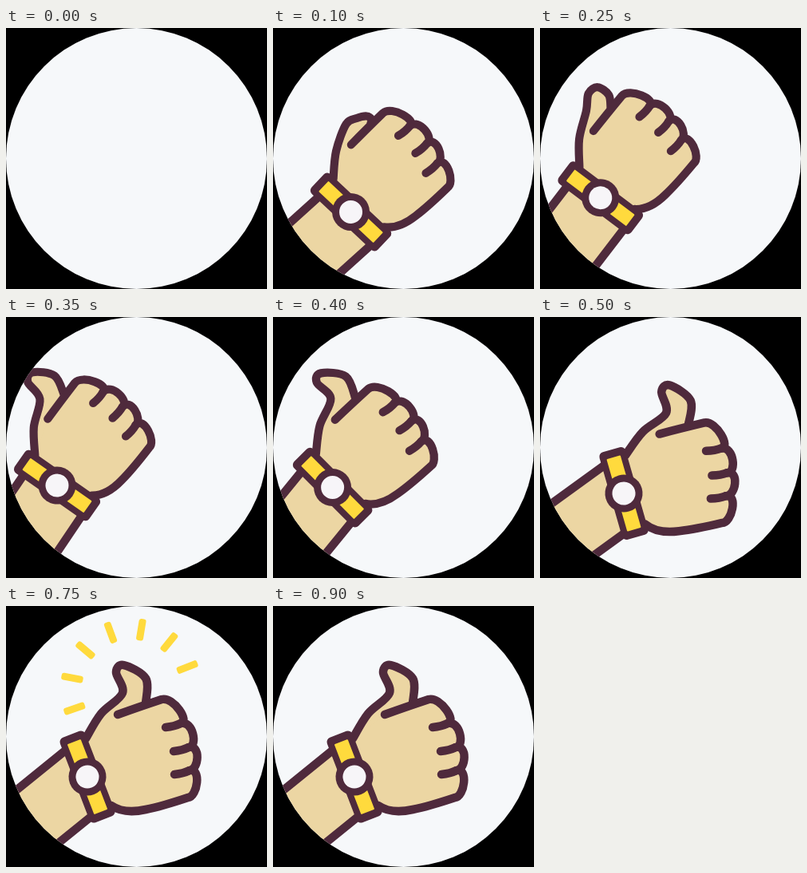
An HTML page with a canvas that plays this animation: 327x327 px, repeating every 0.95 s.

```html
<!DOCTYPE html>
<html lang="en">
<head>
<meta charset="utf-8">
<title>Thumbs up</title>
<style>
  html, body { margin: 0; width: 100%; height: 100%; overflow: hidden; background: #000; }
  canvas { display: block; width: 327px; height: 327px; }
</style>
</head>
<body>
<canvas id="stage"></canvas>
<script>
const SIZE = 327, MID = SIZE / 2, LOOP = 950, STEP = 50, RAD = Math.PI / 180;
const INK = '#4f2a3c', SKIN = '#ecd6a3', GOLD = '#ffda3d', PAPER = '#f6f8fa', DIAL = '#f7f5f8';

const canvas = document.getElementById('stage');
const ctx = canvas.getContext('2d');
const dpr = window.devicePixelRatio || 1;
canvas.width = canvas.height = Math.round(SIZE * dpr);

const mix = (a, b, k) => a + (b - a) * k;
const clamp = k => Math.max(0, Math.min(1, k));
const easeOut = k => 1 - (1 - k) ** 2;
const easeBoth = k => k * k * (3 - 2 * k);

// Key poses; each is reached at its time with its easing
const POSES = [
  { at: 0, x: -10, y: 330, turn: -24, slope: 42, size: 0.97 },
  { at: 150, x: 111, y: 218, turn: -26, slope: 42, size: 0.97, ease: easeOut },
  { at: 350, x: 64, y: 211, turn: -34, slope: 56, size: 0.97, ease: easeOut },
  { at: 500, x: 105, y: 221, turn: 5, slope: 36, size: 1, ease: easeBoth },
  { at: 600, x: 102, y: 214, turn: 0, slope: 39, size: 1, ease: easeOut }
];

function poseAt(t) {
  const i = POSES.findIndex(p => p.at > t);
  if (i < 0) return POSES[POSES.length - 1];
  const a = POSES[i - 1], b = POSES[i];
  const k = b.ease((t - a.at) / (b.at - a.at));
  const pose = {};
  for (const key of ['x', 'y', 'turn', 'slope', 'size']) pose[key] = mix(a[key], b[key], k);
  return pose;
}

// Hand shape, drawn around a wrist at 102, 214
const KNUCKLES = [[195, 117], [219, 147], [229, 177], [230, 206], [228, 240]];

function makeHand() {
  const edge = new Path2D('M140 136Q165 127 195 117');
  KNUCKLES.slice(1).forEach(([x, y], i) => {
    const [px, py] = KNUCKLES[i];
    edge.bezierCurveTo(px + 15, py - 4, x + 12, y - 1, x, y);
  });
  edge.quadraticCurveTo(195, 251, 175, 255);
  edge.quadraticCurveTo(148, 261, 132, 250);

  const fill = new Path2D(edge);
  fill.lineTo(112, 250);
  fill.lineTo(100, 166);

  const creases = new Path2D();
  for (const [x, y] of KNUCKLES.slice(1, 4)) {
    creases.moveTo(x, y);
    creases.quadraticCurveTo(x - 8, y + 4, x - 19, y + 5);
  }
  return { edge, fill, creases };
}
const hand = makeHand();

// The thumb end swings around its joint as it lifts from 0 to 1
function thumbPath(lift) {
  const grow = Math.sin(lift * Math.PI / 2);
  const swing = (from, to, short, long) => {
    const a = mix(from, to, lift) * RAD, r = mix(short, long, grow);
    return [150 + r * Math.cos(a), 118 + r * Math.sin(a)];
  };
  const pts = [
    [100, 166], [119, 135], [146, 109],
    swing(-40, -109, 15, 37), swing(-15, -93, 25, 44), swing(0, -47, 28, 37),
    [175, 122]
  ];
  const at = n => pts[Math.max(0, Math.min(pts.length - 1, n))];
  const path = new Path2D();
  path.moveTo(...pts[0]);
  for (let n = 0; n < pts.length - 1; n++) {
    const [p, q, r, s] = [at(n - 1), at(n), at(n + 1), at(n + 2)];
    path.bezierCurveTo(
      q[0] + (r[0] - p[0]) / 6, q[1] + (r[1] - p[1]) / 6,
      r[0] - (s[0] - q[0]) / 6, r[1] - (s[1] - q[1]) / 6, r[0], r[1]);
  }
  return path;
}

function disc(x, y, r, color) {
  ctx.fillStyle = color;
  ctx.beginPath();
  ctx.arc(x, y, r, 0, 7);
  ctx.fill();
}

function box(x, y, w, h, r, color) {
  ctx.fillStyle = color;
  ctx.beginPath();
  ctx.roundRect(x, y, w, h, r);
  ctx.fill();
}

// Run a drawing with its own position, rotation and scale
function placed(x, y, angle, size, paint) {
  ctx.save();
  ctx.translate(x, y);
  ctx.rotate(angle);
  ctx.scale(size, size);
  paint();
  ctx.restore();
}

function drawRays(t) {
  if (t < 600 || t >= 850) return;
  const inner = mix(48, 89, clamp((t - 700) / 150));
  const outer = mix(48, 89, clamp((t - 550) / 100));
  for (let i = 0; i < 7; i++) {
    placed(157, 104, (161 + 29.6 * i) * RAD, 1, () => box(inner, -4.5, outer - inner, 9, 3, GOLD));
  }
}

function drawForearm({ x, y, slope }, wrist) {
  const c = Math.cos(wrist), s = Math.sin(wrist);
  const near = side => [x - 10 * c - side * s, y - 10 * s + side * c];
  const far = p => [p[0] - 260 * Math.cos(slope * RAD), p[1] + 260 * Math.sin(slope * RAD)];
  const top = near(-42), low = near(47);
  const area = new Path2D(), lines = new Path2D();
  for (const p of [far(top), top, low, far(low)]) area.lineTo(...p);
  for (const p of [top, low]) {
    lines.moveTo(...far(p));
    lines.lineTo(...p);
  }
  ctx.fillStyle = SKIN;
  ctx.fill(area);
  ctx.stroke(lines);
}

function drawHand(lift) {
  const thumb = thumbPath(lift), thumbFill = new Path2D(thumb);
  thumbFill.lineTo(150, 170);
  ctx.translate(-102, -214);
  ctx.fillStyle = SKIN;
  ctx.fill(thumbFill);
  ctx.fill(hand.fill);
  for (const path of [thumb, hand.edge, hand.creases]) ctx.stroke(path);
}

function drawWatch() {
  box(-17, -57, 34, 114, 6, INK);
  box(-9, -47, 18, 94, 1, GOLD);
  disc(0, 0, 23.5, INK);
  disc(0, 0, 14.5, DIAL);
}

function draw(t) {
  ctx.setTransform(dpr, 0, 0, dpr, 0, 0);
  ctx.fillStyle = '#000';
  ctx.fillRect(0, 0, SIZE, SIZE);
  disc(MID, MID, MID, PAPER);
  if (t < STEP) return;

  const pose = poseAt(t);
  const { x, y, turn, size } = pose;
  const wrist = (turn - 21) * RAD;
  ctx.save();
  ctx.beginPath();
  ctx.arc(MID, MID, MID, 0, 7);
  ctx.clip();
  ctx.strokeStyle = INK;
  ctx.lineWidth = 10.5;
  ctx.lineCap = ctx.lineJoin = 'round';
  drawRays(t);
  drawForearm(pose, wrist);
  placed(x, y, turn * RAD, size, () => drawHand(clamp((t - 150) / 240)));
  placed(x, y, wrist, 1, drawWatch);
  ctx.restore();
}

const start = performance.now();
function tick() {
  const t = (performance.now() - start) % LOOP;
  draw(Math.floor(t / STEP) * STEP);
  requestAnimationFrame(tick);
}
tick();
</script>
</body>
</html>
```
